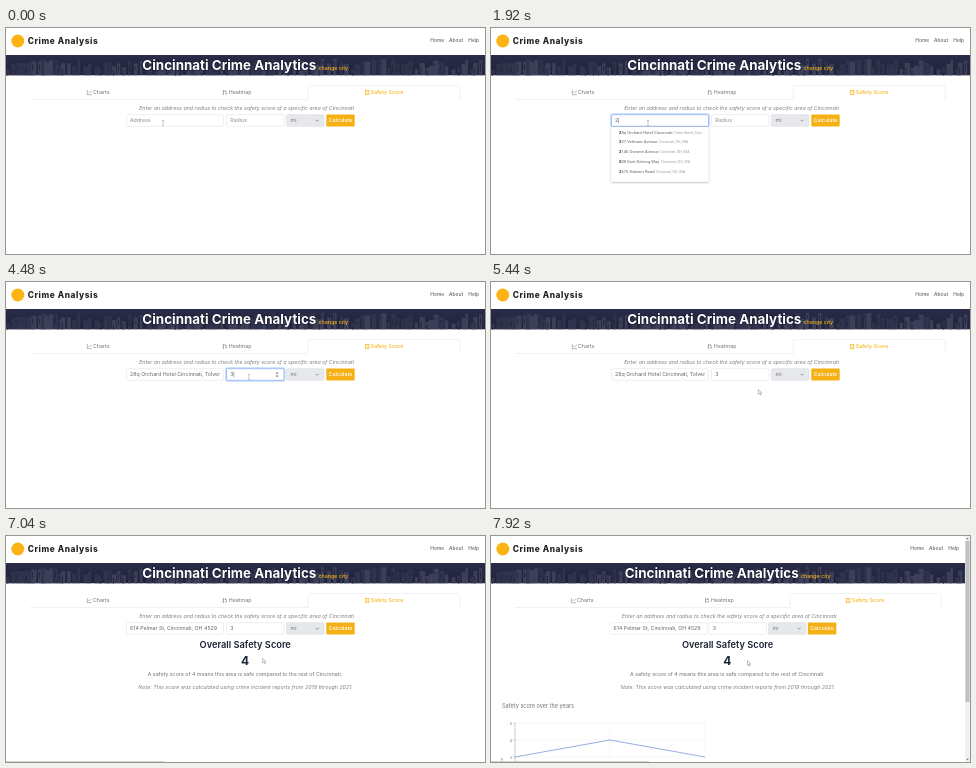
An HTML page for the animation above (8000 ms loop, 479x226 px).

```html
<!DOCTYPE html>
<html lang="en">
<head>
<meta charset="utf-8">
<title>Crime Analysis</title>
<style>
html, body { margin: 0; width: 100%; height: 100%; overflow: hidden; background: #fff; }
svg { display: block; width: 100%; height: 100%; }
text { font: 5.3px Inter, sans-serif; fill: #747474; white-space: pre; }
.brand { font-size: 8.3px; font-weight: 800; letter-spacing: .58px; fill: #222; }
.nav text { font-size: 4.9px; font-weight: 500; fill: #666; }
.title { font-size: 13.4px; font-weight: 700; fill: #fff; }
.gold { fill: #f8b418; font-weight: 500; }
.hint { font-style: italic; fill: #808080; }
.field { fill: #fff; stroke: #e1e4ec; stroke-width: .6; }
.focus { stroke: #8fb4f7; stroke-width: .8; }
.glow { fill: none; stroke: #0d6efd; stroke-opacity: .25; stroke-width: 1.4; }
.value { fill: #606468; font-size: 5.25px; }
.empty { fill: #878d93; }
.row { font: 4.2px Roboto, sans-serif; fill: #606060; }
.row .first { font-weight: 700; fill: #333; }
.row .area { font-size: 3.4px; fill: #999; }
.mid { text-anchor: middle; }
.head { font-size: 9.25px; font-weight: 600; fill: #1c2233; }
.score { font-size: 12px; font-weight: 700; fill: #18293a; }
.line { fill: none; stroke: #e6e9ec; stroke-width: .6; }
.tick { font-size: 3.6px; text-anchor: end; }
</style>
</head>
<body>
<svg viewBox="0 0 479 226">
  <defs>
    <linearGradient id="sky" x2="0" y2="1">
      <stop stop-color="#2a2c48"/><stop offset="1" stop-color="#20223a"/>
    </linearGradient>
    <clipPath id="banner"><rect y="27" width="479" height="20.5"/></clipPath>
    <clipPath id="addrClip"><rect x="122" y="87" width="92.5" height="12"/></clipPath>
    <clipPath id="listClip"><rect x="120" y="99" width="95" height="56"/></clipPath>
    <filter id="shade" x="-10%" y="-10%" width="120%" height="125%">
      <feDropShadow dx="0" dy=".7" stdDeviation="1" flood-opacity=".3"/>
    </filter>
  </defs>

  <circle cx="11.8" cy="13" r="6.5" fill="#fbb413"/>
  <text class="brand" x="21.7" y="15.7">Crime Analysis</text>
  <g class="nav" data-dx="-5">
    <text x="424.3" y="14.3">Home</text><text x="443" y="14.3">About</text><text x="462.3" y="14.3">Help</text>
  </g>

  <g clip-path="url(#banner)">
    <rect y="27" width="479" height="20.5" fill="url(#sky)"/>
    <g id="city"></g>
  </g>
  <g data-dx="-2.6">
    <text class="title" x="136.3" y="41.8" stroke="#15172b" stroke-width="1" paint-order="stroke">Cincinnati Crime Analytics</text>
    <text class="gold" x="312.5" y="42">change city</text>
  </g>

  <path id="tabs" class="line"/>
  <g data-dx="-1">
    <path d="M81.3 62v4.7h4.6" fill="none" stroke="#888" stroke-width=".6"/>
    <path d="M82.2 65.3l1.3-1.6 1 .9 1.4-2" fill="none" stroke="#d98a85" stroke-width=".6"/>
    <text x="87" y="66.4">Charts</text>
  </g>
  <g data-dx="-2.8">
    <path d="M217.4 62v5M219 62.2v1.3h1.6M219 65.8h1.6v-1.2" fill="none" stroke="#888" stroke-width=".8"/>
    <text x="222.8" y="66.4">Heatmap</text>
  </g>
  <g data-dx="-4">
    <rect x="359.6" y="62.3" width="3.3" height="4.4" fill="none" stroke="#f8b418" stroke-width=".7"/>
    <path d="M360.4 63.8h1.7M360.4 65.2h1.7" stroke="#f8b418" stroke-width=".5"/>
    <text class="gold" x="364.8" y="66.4">Safety Score</text>
  </g>

  <g data-dx="-1.4">
    <rect id="addrGlow" class="glow" x="119.8" y="86" width="98.4" height="13" rx="1.8"/>
    <rect id="addrBox" class="field" x="120.5" y="86.7" width="97" height="11.6" rx="1.2"/>
    <text id="addr" class="value" x="124" y="94.4" clip-path="url(#addrClip)"></text>
  </g>
  <g data-dx="-2.5">
    <rect id="radGlow" class="glow" x="219.8" y="86" width="58.9" height="13" rx="1.8"/>
    <rect id="radBox" class="field" x="220.5" y="86.7" width="57.5" height="11.6" rx="1.2"/>
    <text id="rad" class="value" x="224.3" y="94.4"></text>
    <path id="spin" d="M269.6 91.8l1.5-1.8 1.5 1.8zM269.6 93.4l1.5 1.8 1.5-1.8z" fill="#777"/>
    <text class="hint" x="133.2" y="81.6">Enter an address and radius to check the safety score of a specific area of Cincinnati</text>
  </g>
  <path id="caret" stroke="#444" stroke-width=".4"/>
  <g data-dx="-3">
    <rect x="280.5" y="86.7" width="37.5" height="11.6" rx="1.2" fill="#e6e8ec" stroke="#dadde3" stroke-width=".6"/>
    <text x="284.6" y="94.4">mi</text>
    <path d="M309.7 91.8l1.5 1.5 1.5-1.5" fill="none" stroke="#777" stroke-width=".7"/>
  </g>
  <g data-dx="-3.4">
    <rect id="button" x="320.3" y="86.5" width="28.4" height="12" rx=".9"/>
    <text x="322.6" y="94.4" style="fill:#fff;font-weight:500">Calculate</text>
  </g>
  <g id="result">
    <g data-dx="-2.6">
      <text class="head mid" x="239.2" y="111.5">Overall Safety Score</text>
      <text class="score mid" x="239" y="128.6">4</text>
      <text class="mid" x="239" y="139.6">A safety score of 4 means this area is safe compared to the rest of Cincinnati.</text>
      <text class="hint mid" x="239.6" y="153.2">Note: This score was calculated using crime incident reports from 2019 through 2021.</text>
    </g>
  </g>

  <g id="list">
    <rect x="120.2" y="99" width="97.2" height="54.8" rx=".6" fill="#fff" filter="url(#shade)"/>
    <g id="rows" clip-path="url(#listClip)"></g>
  </g>

  <g id="chart">
    <text x="11" y="171.6" style="font-size:5.55px">Safety score over the years</text>
    <path d="M24 187H214V226M119 187V226M24 204H214M24 221H214" fill="none" stroke="#ececec" stroke-width=".5"/>
    <path d="M24 187V226M22 187h2M22 204h2M22 221h2" fill="none" stroke="#999" stroke-width=".5"/>
    <text class="tick" x="21" y="188.5">5</text><text class="tick" x="21" y="205.5">4</text><text class="tick" x="21" y="222.5">3</text>
    <text class="tick" transform="translate(11.5 222) rotate(-90)">Safety score</text>
    <path d="M24 221L119 204L214 221" fill="none" stroke="#7c9bd6" stroke-width=".8"/>
    <rect x="474" width="5" height="226" fill="#f1f1f1"/>
    <rect x="474.4" y="5" width="4.2" height="161" fill="#c1c1c1"/>
    <path d="M475.2 3.2l1.3-1.5 1.3 1.5zM475.2 222.8l1.3 1.5 1.3-1.5z" fill="#666"/>
  </g>
  <path id="status" d="M0 224.9H157q1 0 1 1V226H0z" fill="#d0d1d4"/>

  <g id="cursor">
    <path id="arrow" d="M0 0v4.8l1.1-1 .8 1.8.8-.4-.8-1.7h1.5z" fill="#fff" stroke="#777" stroke-width=".45"/>
    <path id="beam" d="M-1 -2.4h2M0-2.4v4.8M-1 2.4h2" stroke="#888" stroke-width=".45"/>
    <path id="hand" d="M-.4 0h.8v2l1.9.5v1.7l-.7 1.4h-2.2l-1.4-2 .5-.5 1.1.7z" fill="#fff" stroke="#777" stroke-width=".4"/>
  </g>
</svg>
<script>
const $ = id => document.getElementById(id);
const show = (id, on) => { $(id).style.display = on ? '' : 'none'; };
const LOOP = 8000, STEP = 80;

const HOTEL = '28q Orchard Hotel Cincinnati, Tolver Street';
const STREET = '614 Pelmar St, Cincinnati, OH 4529';
const CITY = 'Cincinnati, OH, USA';
const places = [
  ['28q Orchard Hotel Cincinnati', 'Tolver Street, Cinci...'],
  ['227 Velmoor Avenue', CITY],
  ['2146 Osmere Avenue', CITY],
  ['208 East Dolving Way', CITY],
  ['2675 Halvorn Road', CITY]
];
$('rows').innerHTML = places.map(([name, area], i) =>
  `<text class="row" x="128" y="${105.5 + 9.8 * i}"><tspan class="first">${name[0]}</tspan>${name.slice(1)}` +
  `<tspan class="area" dx="1.5">${area}</tspan></text>`).join('');

// Skyline: seeded towers with dark window strips
let seed = 11;
const rnd = () => (seed = seed * 16807 % 2147483647) / 2147483647;
let city = '';
for (let x = 0; x < 479; x += 3 + rnd() * 4) {
  const h = 6 + rnd() * 11, w = 2.5 + rnd() * 3.5, y = 47.5 - h;
  city += `<rect x="${x}" y="${y}" width="${w}" height="${h}" fill="${rnd() < .5 ? '#30334c' : '#3c3f57'}"/>`;
  if (rnd() < .6)
    city += `<rect x="${x + 1}" y="${y + 2 + rnd() * 3}" width=".9" height="${2 + rnd() * 6}" fill="#23253d"/>`;
}
$('city').innerHTML = city;

// Pointer path: time, x, y
const path = [
  [0, 157, 95], [2160, 157, 95], [2640, 165, 105], [2880, 165, 105], [3280, 241, 99.2],
  [3600, 243, 95], [4560, 243, 95], [5040, 262, 112], [5360, 265, 108], [6080, 334, 92.5],
  [6720, 334, 92.5], [7200, 229.5, 132.5], [7360, 229.5, 132.5], [7840, 256.5, 124.5], [LOOP, 256.5, 124.5]
];
function pointer(t) {
  const i = path.findIndex(p => p[0] > t);
  const [t0, x0, y0] = path[i - 1], [t1, x1, y1] = path[i];
  const u = (t - t0) / (t1 - t0), k = u * u * (3 - 2 * u);
  return [x0 + (x1 - x0) * k, y0 + (y1 - y0) * k];
}

function setInput(id, value, hint, focused) {
  $(id).textContent = value || hint;
  $(id).setAttribute('class', value ? 'value' : 'value empty');
  $(id + 'Box').setAttribute('class', focused ? 'field focus' : 'field');
  show(id + 'Glow', focused);
}

function render(t) {
  const within = (a, b) => t >= a && t < b;
  const done = t >= 6800, scrolled = t >= 7600;
  const listed = within(1840, 2880);
  const inAddr = within(1440, 2880), inRad = within(3840, 5120);
  const addr = done ? STREET : t >= 2880 ? HOTEL : t >= 1840 ? '2' : '';
  const rad = t >= 4400 ? '3' : '';

  setInput('addr', addr, 'Address', inAddr);
  setInput('rad', rad, 'Radius', inRad);
  const since = t - (inRad ? (rad ? 4400 : 3840) : addr ? 1840 : 1440);
  show('caret', (inAddr || inRad) && since % 1060 < 530);
  const cx = inRad ? 224.3 + (rad ? 3.5 : 0) : 124 + (addr ? 3.4 : 0);
  $('caret').setAttribute('d', `M${cx} 89.7v5.6`);

  show('list', listed);
  show('result', done);
  show('chart', scrolled);
  show('status', t >= 6240);
  document.querySelectorAll('[data-dx]').forEach(g =>
    g.setAttribute('transform', `translate(${scrolled ? g.dataset.dx : 0} 0)`));
  const [left, right, end] = scrolled ? [299, 450, 474] : [302, 454, 479];
  $('tabs').setAttribute('d',
    `M${end * .05} 71.5H${left}V59q0-1.5 1.5-1.5H${right - 1.5}q1.5 0 1.5 1.5V71.5`);

  const [x, y] = pointer(t);
  const inRow = y > 87 && y < 98.5;
  const overRad = inRow && x > 220.5 && x < 278;
  const overButton = inRow && x > 320.5 && x < 348.5;
  const beam = overRad || inRow && x > 120.5 && x < 217.5;
  const hand = overButton || listed && y > 99;
  show('spin', inRad || overRad);
  $('button').setAttribute('fill', overButton ? '#f7c85f' : '#f5b014');
  show('beam', beam);
  show('hand', hand);
  show('arrow', !beam && !hand);
  $('cursor').setAttribute('transform', `translate(${x} ${y})`);
}

function tick() {
  render(Math.floor(performance.now() % LOOP / STEP) * STEP);
  requestAnimationFrame(tick);
}
tick();
</script>
</body>
</html>
```
